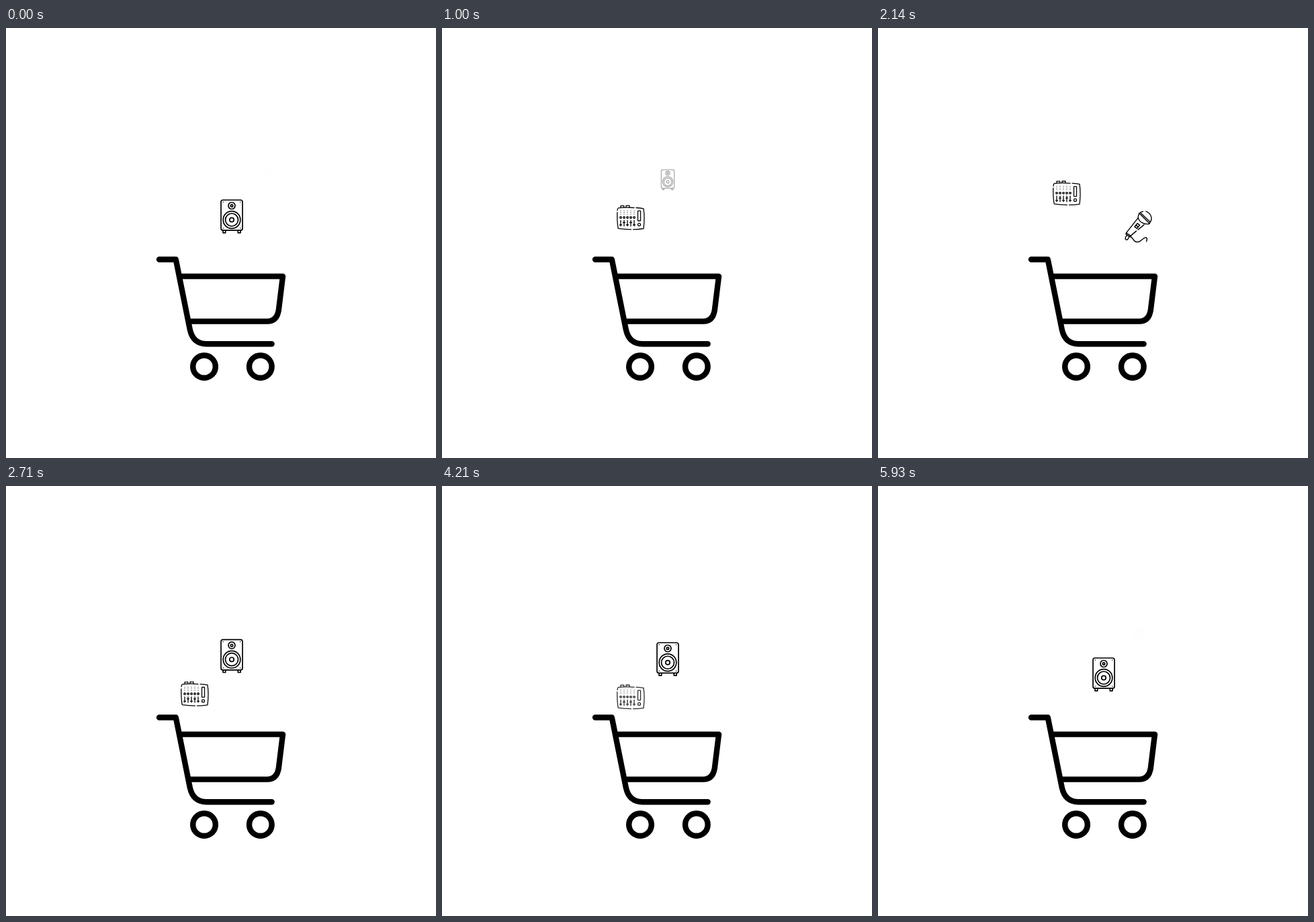
Animation, 640 px wide and 640 px high, one loop 6000 ms. Source, as an HTML page:

```html
<!DOCTYPE html>
<html lang="en">
<head>
<meta charset="utf-8">
<title>Shopping cart</title>
<style>
  html, body { margin: 0; width: 100%; height: 100%; overflow: hidden; background: #fff; }
  svg { display: block; width: 100vw; height: 100vh; fill: none; stroke: #000; stroke-linecap: round; stroke-linejoin: round; }
  .dot { fill: #000; stroke: none; }
</style>
</head>
<body>
<svg viewBox="0 0 640 640">
  <g stroke-width="8.4">
    <path d="M228 344.5H252.8L273.8 449Q278.5 470.2 298.500 470.2H395.600"/>
    <path d="M258.500 369.600H412L405.800 420Q403 436.600 389 436.600H274"/>
    <circle cx="295" cy="504" r="16.800"/>
    <circle cx="378.800" cy="504" r="16.800"/>
  </g>

  <g id="speaker" stroke-width="1.7">
    <rect x="-16" y="-24.500" width="32" height="45.200" rx="3"/>
    <circle cy="-16" r="5"/>
    <circle cy="-16" r="1.700"/>
    <circle cy="5" r="12.800"/>
    <circle cy="5" r="9.500"/>
    <circle cy="5" r="3.200"/>
    <path d="M-13 21V24.300H-9.300V21M9.300 21V24.300H13V21"/>
    <path d="M-12.800 -21.500h.01M12.600 -21.500h.01M-12.800 17.500h.01M12.600 17.500h.01" stroke-width="1.500"/>
  </g>

  <g id="mixer" stroke-width="1.3">
    <path d="M5 -14.500Q-8 -15.500 -18.500 -14.200Q-19.800 -13.500 -20 -10.500M8 -14.500Q14 -14.300 19 -13.200Q21 0 19 16.500Q12 17.700 3.500 17.800M.5 17.800Q-10 17.700 -18.800 16.300Q-20.500 7 -20.200 -7.500"/>
    <path d="M-15 -15V-17.400H-10.200V-15M-7 -15.200V-17.600H-2V-15.200"/>
    <rect x="10.500" y="-9.800" width="4" height="14.800" rx=".6"/>
    <circle cx="12.500" cy="10.600" r="2"/>
  </g>

  <g id="mic" stroke-width="1.4">
    <path d="M6.500 -22.200Q2 -21.500 .3 -18Q-1.300 -14.800 -.8 -12Q3 -3 14.500 -3.500Q19 -6.500 19 -12.500Q18 -20 10.800 -22.500"/>
    <path d="M.6 -19.800L16.300 -4.200M3.500 -19.500L16.500 -7"/>
    <path d="M-.7 -13L-18.500 9.500L-12 14L-3.500 6.800M-1 4.800L8 -2.500"/>
    <path d="M-18.500 9.500L-19 11.500L-13.500 15.300L-12 14"/>
    <path d="M-6 .5L-1.800 -4.500L1.500 -2L-2.500 3ZM-4 -1.800L-.5 .8" stroke-width="1.500"/>
    <path d="M-17.500 13.200Q-20.500 16.500 -19.600 19.200Q-16.500 21.800 -14.500 15.500Q-11.500 14 -9 18Q-5 25.500 2 22Q8.500 16.500 10.800 16.300Q13.500 17.800 11.500 22.500"/>
  </g>
</svg>
<script>
const $ = id => document.getElementById(id);
const clamp = v => Math.max(0, Math.min(1, v));

// Five faders: dotted scale, knob and slider
const faders = [-15, -10, -5, 0, 5].map((x, i) => {
  const handle = i % 2 ? 7.5 : 11;
  return `<path d="M${x} -10V-3" stroke-width="1" stroke-dasharray=".1 2.4"/>
    <circle cx="${x}" r="1.300"/>
    <path d="M${x} 4.500V12.800M${x - 1.500} ${handle}h3"/>`;
}).join('');
$('mixer').innerHTML += faders;

const FPS = 14, FRAMES = 84, CYCLE = 37, SPEED = 4.55;
const items = [
  { el: $('speaker'), x: 336, y: 280.5, at: 0, gain: 0 },
  { el: $('mixer'), x: 281, y: 282, at: 25, gain: 0 },
  { el: $('mic'), x: 388, y: 263.5, at: 10, gain: .5 }
];

function draw(ms) {
  const frame = Math.floor((ms % 6000 + 5) * FPS / 1000) % FRAMES;
  const step = Math.round(frame * 4 * CYCLE / (FRAMES - 1) + .3);
  for (const item of items) {
    const d = (step - item.at + 20 + CYCLE) % CYCLE - 20;
    let y = item.y + SPEED * d;
    y += Math.max(0, y - 295.4) * item.gain;
    const scale = clamp((y - 204) / 36);
    const alpha = Math.min(clamp((y - 217.500) / 21), clamp((330.5 - y) / 20));
    item.el.setAttribute('transform', `translate(${item.x} ${y}) scale(${scale})`);
    item.el.setAttribute('opacity', alpha);
  }
}

const start = performance.now();
function loop() {
  draw(performance.now() - start);
  requestAnimationFrame(loop);
}
loop();
</script>
</body>
</html>
```
